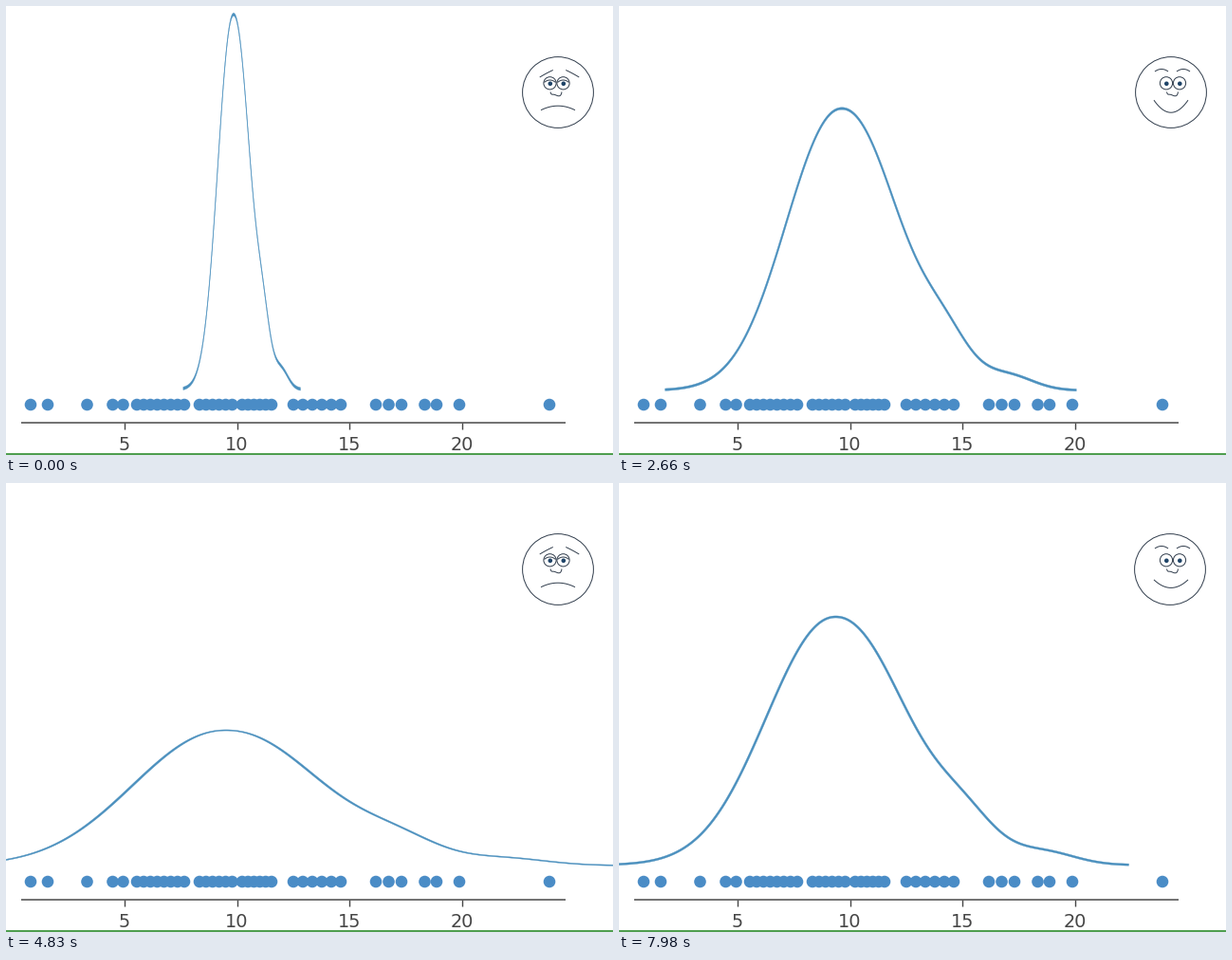
A matplotlib script for the animation above (8000 ms loop, 640x473 px).

```python
import numpy as np
import matplotlib.pyplot as plt
from matplotlib.animation import FuncAnimation

W, H, DPI = 640, 473, 100
FRAMES, INTERVAL = 200, 40
PX = 72 / DPI

BLUE, CURVE, INK, EYE, AXIS = "#4a8cc6", "#4b90be", "#34404f", "#1f4468", "#464646"

fig = plt.figure(figsize=(W / DPI, H / DPI), dpi=DPI, facecolor="white")
ax = fig.add_axes([0, 0, 1, 1])
ax.set_xlim(0, W)
ax.set_ylim(H, 0)
ax.axis("off")


def stroke(x, y, color=INK, width=1.0):
    return ax.plot(x, y, color=color, lw=width * PX, zorder=3,
                   solid_capstyle="butt")[0]


def disc(x, y, r, fill="none", edge="none", width=1.0):
    return ax.add_patch(plt.Circle((x, y), r, facecolor=fill, edgecolor=edge,
                                   lw=width * PX, zorder=3))


def arc(x0, y0, x1, y1, bend, width=1.0):
    """Parabola between two points, sagging by bend in the middle."""
    s = np.linspace(0, 1, 30)
    return stroke(x0 + (x1 - x0) * s,
                  y0 + (y1 - y0) * s + 4 * bend * s * (1 - s), width=width)


def draw_axis():
    stroke([16, 590], [439.3, 439.3], AXIS, 1.5)
    for value in (5, 10, 15, 20):
        x = 6 + value * 23.75
        stroke([x, x], [439.3, 446], AXIS, 1.4)
        ax.text(x, 468, str(value), ha="center", va="baseline", color=AXIS,
                family="DejaVu Sans", fontsize=19.3 * PX)
    stroke([0, W], [472, 472], "#157f15", 1.5)


def draw_data():
    # runs of evenly spaced samples: first, last, count
    runs = [(26, 44, 2), (85.5, 85.5, 1), (112.5, 123.5, 2), (138, 188, 8),
            (204, 238.5, 6), (249, 280, 6), (303, 353, 6), (390, 417, 3),
            (441.5, 454, 2), (478, 573, 2)]
    for run in runs:
        for x in np.linspace(*run):
            disc(x, 420, 6.3, BLUE)


def hump(u, center, sigma, power=2):
    return np.exp(-0.5 * np.abs((u - center) / sigma) ** power)


def density(u):
    """Flat-topped body with two shoulders in the right tail."""
    body = hump(u, 0, np.where(u < 0, 72, 75), 2.1)
    return body + 0.115 * hump(u, 138, 32) + 0.05 * hump(u, 220, 33)


def bell(peak, top, base, scale, pen=2.1):
    """The unit curve stretched in both axes, outline included."""
    unit = 262
    u = np.linspace(-233, 309, 400)
    v = unit * density(u)
    du, dv = np.gradient(u), np.gradient(v)
    size = np.hypot(du, dv) * 2 / pen
    nu, nv = -dv / size, du / size
    x = np.r_[u + nu, (u - nu)[::-1]] * scale + peak
    y = base - np.r_[v + nv, (v - nv)[::-1]] * (base - top) / unit
    return ax.fill(x, y, color=CURVE, lw=0.35 * PX, zorder=4)


def face(mood, cx):
    """Mood is the sag of the mouth; brows, eyes and lids follow from it."""
    parts = [disc(cx, 91, 37.4, edge=INK)]

    corner = 107 - 0.6 * mood
    parts.append(arc(564, corner, 600, corner, mood))

    droop = max(0, 3 - mood)
    inner = 4.5 + 0.3 * droop
    for side in (-1, 1):
        parts.append(arc(583.5 + side * inner, 69 - 0.2 * droop,
                         583.5 + side * (inner + 14), 69 + 0.8 * droop,
                         0.3 * droop - 2.5))

    mid = 580.5 if mood < 0 else 584
    for ex in (mid - 7, mid + 7):
        parts.append(disc(ex, 81.3, 6.6, edge=INK))
        parts.append(disc(ex + 0.3, 81.8, 2.3, EYE))
        if mood < 0:
            parts.append(arc(ex - 6, 80.5, ex + 6, 80.5, -2.5))

    s = np.linspace(-1, 1, 40)
    parts.append(stroke(mid - 0.5 + 6 * s,
                        90.5 + 3.5 * (1 - s**8) + 0.8 * np.sin(np.pi * s)))
    return parts


draw_axis()
draw_data()

# from narrowest to widest
STATES = [bell(240, 9, 404, 0.228) + face(-4.5, 582),
          bell(240.5, 45, 406, 0.347) + face(0.5, 581),
          bell(240.5, 76.5, 408, 0.524) + face(8.5, 581),
          bell(235, 108, 405, 0.80) + face(13, 582),
          bell(228.5, 141, 402.5, 1.0) + face(8.5, 581),
          bell(232, 227, 403, 1.17) + face(0.5, 581),
          bell(232, 260.5, 403, 1.34) + face(-4.5, 582),
          bell(240, 304.5, 402, 1.76) + face(-11, 581)]

# widen step by step to the last state, then back again
STARTS = [0, 840, 1610, 2380, 3010, 3780, 4550, 5390, 6230, 7000, 7630]


def update(i):
    step = np.searchsorted(STARTS, i * INTERVAL + 30, side="right") - 1
    last = len(STATES) - 1
    now = last - abs(last - step)
    for k, parts in enumerate(STATES):
        for part in parts:
            part.set_visible(k == now)
    return []


anim = FuncAnimation(fig, update, frames=FRAMES, interval=INTERVAL,
                     init_func=lambda: update(0), repeat=True, repeat_delay=0)
plt.show()
```
